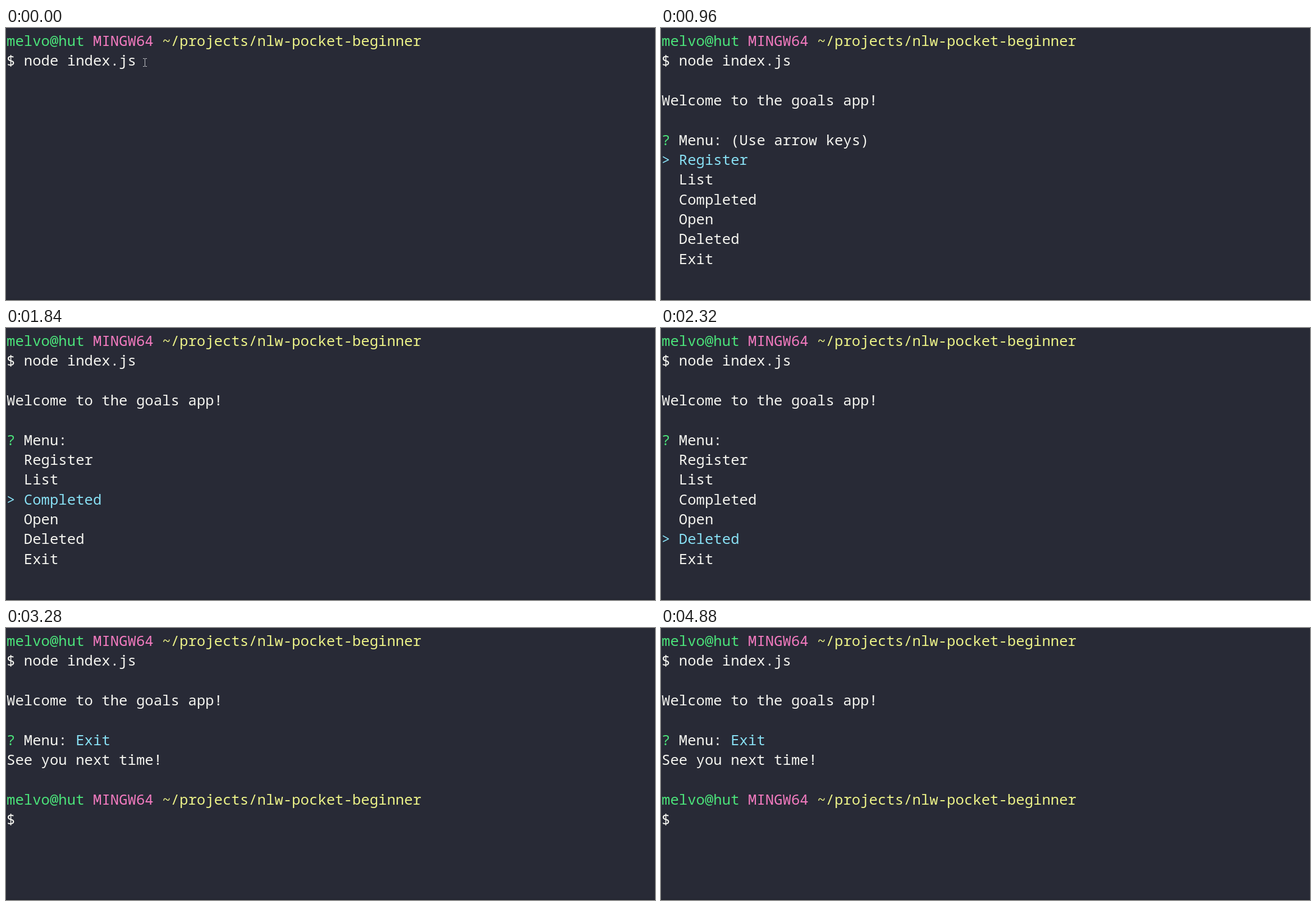
An HTML page with a canvas for the animation above (4960 ms loop, 1156 by 485 pixels).

```html
<!DOCTYPE html>
<html lang="en">
<head>
<meta charset="utf-8">
<title>Terminal menu</title>
<style>
html, body { margin: 0; width: 100%; height: 100%; overflow: hidden; background: #282a36; }
canvas { display: block; }
</style>
</head>
<body>
<canvas id="stage" width="1156" height="485"></canvas>
<script>
const ctx = document.getElementById('stage').getContext('2d');
const W = 1156, H = 485, LOOP = 4960;
const LEFT = 1, COL = 15.4, ROW = 35.33, BASE = 32;
const C = {
  bg: '#282a36', edge: '#23252f', white: '#f4f4ef', green: '#4be37a',
  pink: '#f47bc0', yellow: '#ecf288', cyan: '#88dff3'
};
const ITEMS = ['Register', 'List', 'Completed', 'Open', 'Deleted', 'Exit'];
const POINTER_HIDE = 80, MENU = 320, FIRST_KEY = 1120, KEY_GAP = 400, EXIT = 3120;

function put(row, col, text, color = C.white) {
  ctx.fillStyle = color;
  ctx.fillText(text, LEFT + col * COL, BASE + row * ROW);
}

function prompt(row, command = '') {
  put(row, 0, 'melvo@hut', C.green);
  put(row, 10, 'MINGW64', C.pink);
  put(row, 18, '~/projects/nlw-pocket-beginner', C.yellow);
  put(row + 1, 0, '$');
  put(row + 1, 2, command);
}

function pointer(x, y) {
  ctx.fillStyle = '#c4c5c9';
  ctx.fillRect(x, y - 6, 1, 13);
  for (const end of [-7, 7]) {
    ctx.fillRect(x - 3, y + end, 3, 1);
    ctx.fillRect(x + 1, y + end, 3, 1);
  }
}

function menu(selected) {
  if (selected === 0) put(5, 8, '(Use arrow keys)');
  ITEMS.forEach((item, i) => {
    const on = i === selected;
    if (on) put(6 + i, 0, '>', C.cyan);
    put(6 + i, 2, item, on ? C.cyan : C.white);
  });
}

function draw(t) {
  ctx.fillStyle = C.bg;
  ctx.fillRect(0, 0, W, H);
  ctx.fillStyle = C.edge;
  ctx.fillRect(0, H - 2, W, 2);
  ctx.font = '500 25.667px "Noto Sans Mono", "DejaVu Sans Mono", monospace';

  prompt(0, 'node index.js');
  if (t < POINTER_HIDE) pointer(247, 61);
  if (t < MENU) return;

  put(3, 0, 'Welcome to the goals app!');
  put(5, 0, '?', C.green);
  put(5, 2, 'Menu:');
  if (t < EXIT) {
    const presses = Math.floor((t - FIRST_KEY) / KEY_GAP) + 1;
    menu(Math.min(ITEMS.length - 1, Math.max(0, presses)));
  } else {
    put(5, 8, 'Exit', C.cyan);
    put(6, 0, 'See you next time!');
    prompt(8);
  }
}

const start = performance.now();
function tick() {
  draw((performance.now() - start) % LOOP);
  requestAnimationFrame(tick);
}
tick();
</script>
</body>
</html>
```
